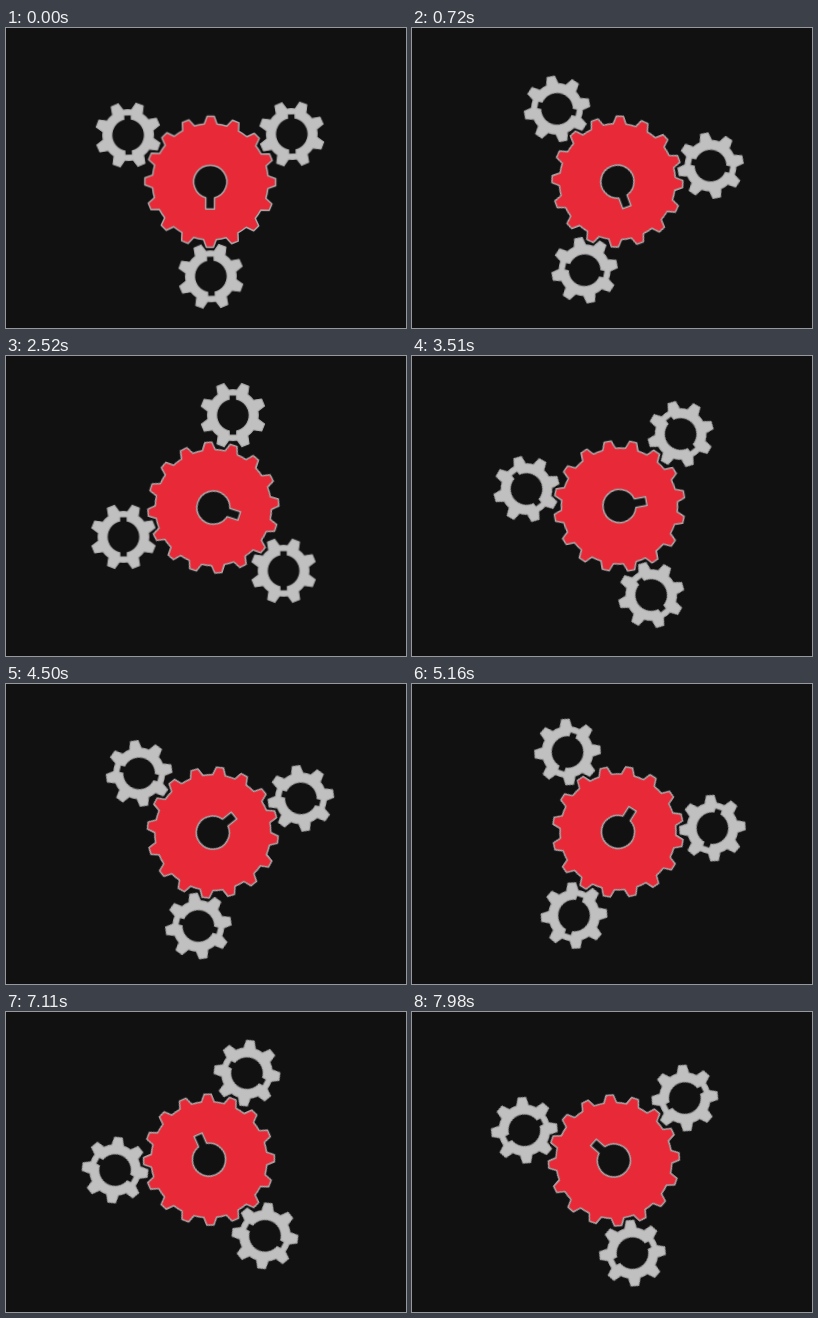
Animation of 400x300 px, one loop 8000 ms. Source, as an HTML page:

```html
<!DOCTYPE html>
<html lang="en">
<head>
<meta charset="utf-8">
<title>Planetary gears</title>
<style>
  html, body { margin: 0; width: 100%; height: 100%; overflow: hidden; background: #111; }
  svg { display: block; width: 100vw; height: 100vh; }
  path { stroke-width: 1.5; stroke-linejoin: round; fill-rule: evenodd; }
  .wheel { fill: #e82938; stroke: #aaa; }
  .planet { fill: #c0c0c0; stroke: #aeaeae; stroke-width: 1.2; }
  /* Every part turns at a multiple of one base angle; nested turns add up. */
  .turn { --start: -0.4deg; --end: 229.2deg; transform-origin: 0 0; animation: turn 8s linear infinite; }
  .eccentric { --ratio: -1; }
  .carrier { --ratio: 2; }
  .spin { --ratio: 4; }
  @keyframes turn {
    from { transform: rotate(calc(var(--ratio) * var(--start))); }
    to { transform: rotate(calc(var(--ratio) * var(--end))); }
  }
</style>
</head>
<body>
<svg viewBox="0 0 400 300">
  <g transform="translate(204.3 150.6)">
    <g class="turn eccentric">
      <g transform="translate(0 3.2)">
        <path class="wheel" id="wheel"/>
        <g class="turn carrier" id="carrier"></g>
      </g>
    </g>
  </g>
</svg>
<script>
const polar = (r, a) => `${(r * Math.cos(a)).toFixed(2)} ${(r * Math.sin(a)).toFixed(2)}`;

// Trapezoid teeth joined by arcs along the root circle; angles in radians.
function rim({ teeth, outer, root, tip, base, phase }) {
  let d = '';
  for (let i = 0; i < teeth; i++) {
    const a = phase + i * 2 * Math.PI / teeth;
    d += i ? `A${root} ${root} 0 0 1 ` : 'M';
    d += `${polar(root, a - base)}L${polar(outer, a - tip)}L${polar(outer, a + tip)}L${polar(root, a + base)}`;
  }
  return d + `A${root} ${root} 0 0 1 ${polar(root, phase - base)}Z`;
}

// Round bore with a slot at the bottom and optionally one at the top.
function bore(r, half, depth, both) {
  const y = Math.sqrt(r * r - half * half);
  let d = `M${half} ${y}V${depth}H${-half}V${y}`;
  if (both) d += `A${r} ${r} 0 0 1 ${-half} ${-y}V${-depth}H${half}V${-y}A${r} ${r} 0 0 1 ${half} ${y}Z`;
  else d += `A${r} ${r} 0 1 1 ${half} ${y}Z`;
  return d;
}

document.getElementById('wheel').setAttribute('d',
  rim({ teeth: 16, outer: 65.5, root: 58, tip: 0.054, base: 0.11, phase: 0 }) +
  bore(16.6, 4.4, 27.3, false));

const planet =
  rim({ teeth: 8, outer: 32.8, root: 25.3, tip: 0.115, base: 0.23, phase: Math.PI / 8 }) +
  bore(16.3, 3.8, 20, true);

document.getElementById('carrier').innerHTML = [90, 210, 330].map(a =>
  `<g transform="rotate(${a}) translate(94.5) rotate(${-a})">
     <g class="turn spin"><path class="planet" d="${planet}"/></g>
   </g>`).join('');
</script>
</body>
</html>
```
